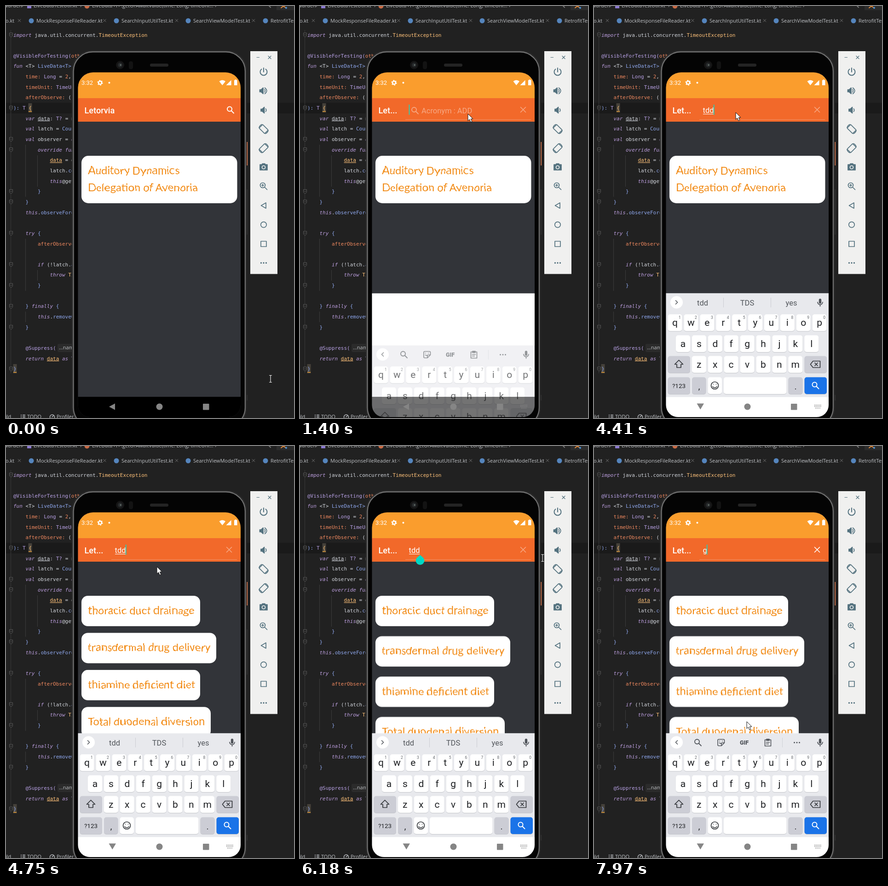
An HTML page for the animation above (8000 ms loop, 626 by 894 pixels).

```html
<!DOCTYPE html>
<html lang="en">
<head>
<meta charset="utf-8">
<title>Acronym search</title>
<style>
html, body { margin: 0; width: 100%; height: 100%; overflow: hidden; background: #212121; }
svg { display: block; width: 626px; height: 894px; }
text { font-family: Roboto, sans-serif; white-space: pre; }
.code text { font: 11px "DejaVu Sans Mono", monospace; fill: #d4d7de; }
.ui text { font: 11px "Open Sans", "Noto Sans", sans-serif; fill: #c0c3c7; }
.k { fill: #bd9fdf; font-style: italic; }
.o { fill: #f0895f; }
.y { fill: #ffc27a; }
.v { fill: #b9a2e6; }
.b { fill: #8fa8ee; }
.u { fill: #ffc27a; text-decoration: underline; }
.w { text-decoration: underline; }
.line { fill: none; stroke-linecap: round; stroke-linejoin: round; }
.hand text { font: 400 23.8px Lato, sans-serif; fill: #f28c18; filter: url(#wobble); }
.mid { text-anchor: middle; }

.s { animation: 8s step-end infinite; }
.m { animation: 8s linear infinite; }
.idle { animation-name: idle; }
.open { animation-name: open; }
.hint { animation-name: hint; }
.t1 { animation-name: t1; }
.t2 { animation-name: t2; }
.t3 { animation-name: t3; }
.under { animation-name: under; }
.tg { animation-name: tg; }
.clear { animation-name: clear; }
.caret { animation-name: caret; }
.drop { animation-name: drop; }
.tools { animation-name: tools; }
.sugA { animation-name: sugA; }
.sugB { animation-name: sugB; }
.back { animation-name: back; }
.down { animation-name: down; }
.sheet { animation-name: sheet; }
.keys { animation-name: keys; }
.nav { animation-name: nav; }
.old { animation-name: old; }
.list { animation-name: list; }
.card { animation-name: spread; }
.mouse { animation-name: mouse; }
.beam { animation-name: beam; }
.arrow { animation-name: arrow; }

@keyframes idle { 0% { opacity: 1 } 14.125%, to { opacity: 0 } }
@keyframes open { 0% { opacity: 0 } 14.125%, to { opacity: 1 } }
@keyframes hint { 0% { opacity: 0 } 14.125% { opacity: .42 } 35.125% { opacity: 0 } 86.25% { opacity: .42 } 99.5%, to { opacity: 0 } }
@keyframes t1 { 0% { opacity: 0 } 35.125% { opacity: 1 } 36.75%, to { opacity: 0 } }
@keyframes t2 { 0% { opacity: 0 } 36.75% { opacity: 1 } 38.375%, to { opacity: 0 } }
@keyframes t3 { 0% { opacity: 0 } 38.375% { opacity: 1 } 86.25%, to { opacity: 0 } }
@keyframes under { 0% { opacity: 0 } 43.25% { opacity: 1 } 86.25%, to { opacity: 0 } }
@keyframes tg { 0% { opacity: 0 } 99.5%, to { opacity: 1 } }
@keyframes clear { 0% { opacity: .42 } 86.25%, to { opacity: 1 } }
@keyframes caret {
  0% { opacity: 0; transform: none }
  15.75% { opacity: 1 }
  22% { opacity: 0 }
  28.5% { opacity: 1; transform: none }
  35.125% { opacity: 1; transform: translateX(5.5px) }
  36.75% { opacity: 1; transform: translateX(14.5px) }
  38.375% { opacity: 1; transform: translateX(23.5px) }
  49.125% { opacity: 0; transform: translateX(23.5px) }
  55.125% { opacity: 1; transform: translateX(23.5px) }
  62% { opacity: 0; transform: translateX(23.5px) }
  68.2% { opacity: 1; transform: translateX(23.5px) }
  74.75% { opacity: 0; transform: none }
  86.25% { opacity: 1; transform: none }
  92.5% { opacity: 0; transform: none }
  98.75% { opacity: 1; transform: none }
  99.5%, to { opacity: 1; transform: translateX(8.5px) }
}
@keyframes drop { 0% { opacity: 0 } 74.75% { opacity: 1 } 86.25%, to { opacity: 0 } }
@keyframes tools { 0% { opacity: 1 } 37.5% { opacity: 0 } 87.5%, to { opacity: 1 } }
@keyframes sugA { 0% { opacity: 0 } 37.5% { opacity: 1 } 43.25%, to { opacity: 0 } }
@keyframes sugB { 0% { opacity: 0 } 43.25% { opacity: 1 } 87.5%, to { opacity: 0 } }
@keyframes back { 0% { opacity: 1 } 18.4%, to { opacity: 0 } }
@keyframes down { 0% { opacity: 0 } 18.4%, to { opacity: 1 } }
@keyframes sheet { 0% { opacity: 0 } 15.75%, to { opacity: 1 } }
@keyframes keys {
  0%, 15.75% { opacity: 0; transform: translateY(224px) }
  17.5% { opacity: .62; transform: translateY(114px); animation-timing-function: ease-out }
  20%, to { opacity: 1; transform: none }
}
@keyframes nav { 0%, 15.75% { opacity: 1 } 17.5% { opacity: .55 } 20%, to { opacity: 0 } }
@keyframes old { 0%, 56.75% { opacity: 1 } 58.4%, to { opacity: 0 } }
@keyframes list { 0%, 57.5% { opacity: 0 } 59.2%, to { opacity: 1 } }
@keyframes spread {
  0%, 60.25% { transform: translateY(calc(var(--i) * -7.2px)); animation-timing-function: ease-in-out }
  63.75%, to { transform: none }
}
@keyframes mouse {
  0%, .875% { transform: translate(575px, 809px) }
  3.75% { transform: translate(556px, 600px) }
  6.25% { transform: translate(515px, 400px) }
  8.5% { transform: translate(462px, 270px) }
  10.875%, 14.5% { transform: translate(484px, 232px) }
  16.625% { transform: translate(381px, 235px) }
  17.5% { transform: translate(365px, 234px) }
  20% { transform: translate(354px, 233px) }
  23.5%, 56.75% { transform: translate(308px, 231px) }
  59.375% { transform: translate(328px, 262px) }
  60.5% { transform: translate(329px, 259px) }
  64.6% { transform: translate(318px, 238px) }
  70.6%, 74.75% { transform: translate(310px, 232px) }
  77.25% { transform: translate(527px, 243px) }
  80% { transform: translate(575px, 236px) }
  84%, 86.5% { transform: translate(486px, 224px) }
  88.5% { transform: translate(470px, 310px) }
  94.5% { transform: translate(396px, 570px) }
  96.6% { transform: translate(348px, 618px) }
  99.5%, to { transform: translate(332px, 598px) }
}
@keyframes beam { 0% { opacity: 1 } 6% { opacity: 0 } 76.9% { opacity: 1 } 77.6%, to { opacity: 0 } }
@keyframes arrow { 0% { opacity: 0 } 6% { opacity: 1 } 76.9% { opacity: 0 } 77.6%, to { opacity: 1 } }
</style>
</head>
<body>
<svg viewBox="0 0 626 894">
  <defs>
    <filter id="wobble" x="-5%" y="-20%" width="110%" height="140%" color-interpolation-filters="sRGB">
      <feTurbulence type="fractalNoise" baseFrequency=".055" numOctaves="1" seed="4"/>
      <feDisplacementMap in="SourceGraphic" scale="5" xChannelSelector="R" yChannelSelector="G"/>
    </filter>
    <clipPath id="screen"><path d="M156.500 177a33 33 0 0 1 33-33H477a33 33 0 0 1 33 33V866a26 26 0 0 1-26 26H182.500a26 26 0 0 1-26-26Z"/></clipPath>
    <clipPath id="body"><path d="M156 251H511V892H156Z"/></clipPath>
    <g id="lens" class="line"><circle cx="-2" cy="-2" r="5"/><path d="M2 2L7 7"/></g>
    <g id="mic"><rect x="-2.700" y="-8.500" width="5.400" height="11" rx="2.700"/><path class="line" stroke="#50545a" stroke-width="1.700" d="M-5.500-1a5.500 5.500 0 0 0 11 0M0 5V8"/></g>
  </defs>

  <!-- editor -->
  <rect y="210" width="626" height="23" fill="#1a1a1a"/>
  <path d="M10.500 52V797" stroke="#3a3a3a"/>
  <path d="M42.500 301V414M68.500 324V392M42.500 505V618M68.500 573V596M42.500 663V686" stroke="#3b3b3b"/>
  <g id="folds" fill="#212121" stroke="#595959"></g>
  <rect x="48.500" y="211" width="8" height="20" fill="#45413a"/>
  <rect x="15.500" y="777" width="8" height="20" fill="#45413a"/>
  <path d="M49 229h7M16 795h7" stroke="#eda23a" stroke-width="1.500"/>
  <g id="code" class="code"></g>
  <g class="ui">
    <rect x="112" y="733" width="50" height="18" rx="3" fill="#2b2b2b"/>
    <text x="115" y="745">...names</text>
    <text x="-1" y="3">varden</text><text x="34" y="3">›</text>
    <text x="60" y="3">LiveDataTestUtil.kt</text><text x="161" y="3">›</text>
    <text x="187" y="3">LiveData&lt;T&gt;.getOrAwaitValue(time: Long, timeUni...</text><text x="454" y="3">›</text>
    <rect x="46" y="-4" width="9" height="9" fill="#8c7ad0"/>
    <circle cx="176" cy="0" r="5.500" fill="#c96b45"/>
    <path class="line" d="M570-2l5 5" stroke="#777" stroke-width="2"/>
    <rect x="588" y="0" width="38" height="9" fill="#2c2c2c"/>
    <path class="line" d="M598 4l5-4 5 4" stroke="#e48a3a" stroke-width="2"/><circle cx="609" cy="4" r="2" fill="#4c94d8"/>
    <text x="-1" y="36">o.kt</text>
    <text x="-1" y="895">ild</text><text x="46" y="895">TODO</text><text x="110" y="895">Profiler</text>
    <path d="M32 887.500h2m2 0h6M32 890.500h2m2 0h6M32 893.500h2m2 0h6" stroke="#b4b7bb" stroke-width="1.500"/>
    <path class="line" d="M96 894a5 5 0 1 1 9 0M100 892l3-3" stroke="#b4b7bb" stroke-width="1.500"/>
    <g id="tabs"></g>
  </g>

  <!-- phone -->
  <path d="M522 295h3v51h-3Z" fill="#ef8254"/>
  <path d="M522 398h2.500v98h-2.500ZM522 844h2.500v12h-2.500Z" fill="#3a3a3a"/>
  <rect x="144" y="97.500" width="378.500" height="818" rx="44" fill="#030303" stroke="#2c2c2c" stroke-width="2"/>
  <rect x="146.500" y="99.500" width="373.500" height="814" rx="42" fill="#050505" stroke="#727272" stroke-width="2.400"/>
  <rect x="150.500" y="103" width="365.500" height="807" rx="38" fill="#040404"/>
  <circle cx="248" cy="128" r="9" fill="#151515"/><circle cx="248" cy="128" r="5" fill="#26292b"/><circle cx="249" cy="128" r="1.700" fill="#66706a"/>
  <rect x="267" y="120" width="9" height="17" rx="4" fill="#131313"/>
  <rect x="313" y="125" width="40" height="6.500" rx="3" fill="#242424"/>

  <g clip-path="url(#screen)">
    <rect x="156" y="144" width="355" height="750" fill="#323439"/>
    <rect x="156" y="144" width="355" height="56.500" fill="#fa9d2d"/>
    <rect x="156" y="200" width="355" height="51" fill="#f2692a"/>
    <g fill="#fff">
      <text x="164" y="171" font-size="13">3:32</text>
      <circle cx="204.500" cy="166.500" r="3.400" fill="none" stroke="#fff" stroke-width="2.500"/>
      <circle cx="204.500" cy="166.500" r="5.300" fill="none" stroke="#fff" stroke-width="1.600" stroke-dasharray="2.600 2.950"/>
      <circle cx="224.500" cy="166.500" r="2"/>
      <path d="M463.500 163.500q6.750-5.500 13.500 0l-6.750 8.500Z"/>
      <path d="M489.500 161v11h-11Z" fill-opacity=".45"/><path d="M489.500 161v11h-11l6-6Z"/>
      <path d="M497.500 161v-1.200h3.500V161h1.500v11h-6.500V161Z"/>
    </g>

    <!-- app bar -->
    <g class="s idle" fill="#fff">
      <text x="170.500" y="233" font-size="18.200" font-weight="500">Letorvia</text>
      <use href="#lens" x="488" y="225.500" stroke="#fff" stroke-width="2"/>
    </g>
    <g class="s open" fill="#fff" font-size="16.500">
      <text x="170.500" y="233" font-size="18.200" font-weight="500">Let...</text>
      <path d="M229 246.500H502" stroke="#fff" stroke-opacity=".27"/>
      <g class="s hint">
        <use href="#lens" x="250" y="227" stroke="#fff" stroke-width="1.800"/>
        <text x="264" y="233">Acronym : ADD</text>
      </g>
      <text class="s t1" x="236.500" y="232">t</text>
      <text class="s t2" x="236.500" y="232">td</text>
      <text class="s t3" x="236.500" y="232">tdd</text>
      <path class="s under" d="M237 234.500H260" stroke="#fff"/>
      <text class="s tg" x="236.500" y="232">g</text>
      <path class="line s clear" d="M479.500 219.500l11 11m0-11l-11 11" stroke="#fff" stroke-width="1.600"/>
      <path class="s caret" d="M237.500 214V236" stroke="#1fd3bd" stroke-width="1.800"/>
    </g>

    <!-- results -->
    <g class="hand" clip-path="url(#body)">
      <g class="m old">
        <rect x="164" y="325" width="338.500" height="103" rx="15" fill="#fff"/>
        <text x="178" y="365">Auditory Dynamics</text>
        <text x="178" y="402">Delegation of Avenoria</text>
      </g>
      <g class="m list" id="list"></g>
    </g>
    <path class="s drop" d="M261 236.500l6.500 5.500a9.300 9.300 0 1 1-13 0Z" fill="#00d9c5"/>

    <!-- keyboard -->
    <rect class="s sheet" x="156" y="623.500" width="355" height="269" fill="#fff"/>
    <g class="m keys">
      <rect x="156" y="623.500" width="355" height="225" fill="#e8e9ed"/>
      <circle cx="179.500" cy="643" r="13.500" fill="#fff"/>
      <g class="s tools">
        <path class="line" d="M181.500 639l-4 4 4 4" stroke="#50545a" stroke-width="1.600"/>
        <use href="#lens" x="226" y="643.500" stroke="#50545a" stroke-width="1.800"/>
        <g class="line" stroke="#50545a" stroke-width="1.600">
          <path d="M283.500 644v-5.500a2 2 0 0 0-2-2h-10.500a2 2 0 0 0-2 2v10a2 2 0 0 0 2 2h6ZM283.500 644h-4.500a2 2 0 0 0-2 2v4.500M273 640v.5M279 640v.5M272.500 644q2 2 3.500 1"/>
          <path d="M371.500 637.500h13v13.500h-13ZM375 636h6v3h-6ZM374.500 643h7M374.500 646.500h5"/>
        </g>
        <text class="mid" x="326.500" y="647.500" font-size="12.500" font-weight="900" fill="#50545a">GIF</text>
        <path d="M409.500 633v21" stroke="#d0d2d7"/>
        <path class="line" d="M435.500 643.500h0m5.500 0h0m5.500 0h0" stroke="#50545a" stroke-width="3"/>
      </g>
      <g id="sugs" class="mid" font-size="16.500" fill="#53575c"></g>
      <use href="#mic" x="491.500" y="643.500" fill="#50545a"/>
      <g id="keys" class="mid" font-size="21" fill="#1d1f22"></g>
      <g class="line" stroke="#33363a" stroke-width="1.700">
        <path d="M184.500 768.500l9 9h-4.500v7h-9v-7h-4.500Z"/>
        <path d="M476 770.500h15.500v14H476l-5.500-7ZM480 774.500l6 6m0-6l-6 6"/>
        <circle cx="262.500" cy="823.500" r="8"/><path d="M258 826q4.500 5 9 0M259.500 820.500h0M265.500 820.500h0"/>
      </g>
      <use href="#lens" x="481.500" y="823.500" stroke="#fff" stroke-width="2"/>
    </g>

    <!-- navigation bar -->
    <rect class="m nav" x="156" y="848" width="355" height="45"/>
    <g fill="#858585">
      <path class="s back" d="M224 869.500l13-7v14Z"/>
      <path class="s down" d="M223.500 862.500h15.500l-7.750 13Z"/>
      <circle cx="333.500" cy="869.500" r="7"/>
      <rect x="428" y="863" width="13.500" height="13.500" rx="1"/>
      <path class="s sheet" d="M479 866h15m-15 3h15m-13 3.500h11" fill="none" stroke="#858585" stroke-width="1.700" stroke-dasharray="1.800 1.400"/>
    </g>
  </g>

  <!-- emulator controls -->
  <rect x="531" y="98" width="59" height="483.500" fill="#f0f0ef"/>
  <g class="line" stroke="#54727f" stroke-width="1.700">
    <path d="M545 111.500h5.500M570 108.500l6 6m0-6l-6 6" stroke-width="1.200"/>
    <path d="M560 134.500v8.500M555.500 137a7.500 7.500 0 1 0 9 0" stroke-width="2"/>
    <path d="M551.500 181.500h3l4.500-4v13l-4.500-4h-3Z" fill="#54727f"/>
    <path d="M562 181q2.500 3 0 6M562.500 177.500q8.500 6.500 0 13"/>
    <path d="M554 223.500h3l4.500-4v13l-4.500-4h-3Z" fill="#54727f"/><path d="M564.500 223q2.500 3 0 6"/>
    <g id="turn"><rect x="554.500" y="258.500" width="11" height="17" rx="1" transform="rotate(-45 560 267)"/><path d="M550 264a10.500 10.500 0 0 1 6-7M570 270a10.500 10.500 0 0 1-6 7"/></g>
    <use href="#turn" transform="matrix(-1 0 0 1 1120 41.500)"/>
    <path d="M552 344h4l1.500-2h5l1.500 2h4v12h-16Z" fill="#54727f"/><circle cx="560" cy="350" r="3.500" stroke="#f0f0ef" fill="#54727f"/>
    <circle cx="558" cy="389" r="5.500"/><path d="M562.500 393.500l5 5M555.500 389h5M558 386.500v5"/>
    <path d="M554.500 433l10.500-6v12Z"/><circle cx="560" cy="474.500" r="6.200"/><rect x="554" y="510.500" width="12" height="11.500"/>
    <path d="M554.500 557.500h0m5.500 0h0m5.500 0h0" stroke-width="3.300"/>
  </g>

  <g class="m mouse">
    <path class="s beam line" d="M-2.500-7.500h2l.5.500.5-.5h2M0-7V7M-2.500 7.500h2l.5-.5.500.5h2" stroke="#eee" stroke-width="1.200"/>
    <path class="s arrow" d="M0 0V15.200L3.500 12l2.500 6 2.800-1.200L6.300 11H11Z" fill="#fff" stroke="#111"/>
  </g>
</svg>
<script>
const $ = id => document.getElementById(id);
const esc = s => s.replace(/&/g, '&amp;').replace(/</g, '&lt;');
const rowY = r => 62.500 + 22.65 * r;

// Row, indent, tokens; the first letter of a token is its class
const code = [
  [0, 0, 'kimport |pjava.util.concurrent.|yTimeoutException'],
  [2, 0, 'v@VisibleForTesting(|ootherwise'],
  [3, 0, 'kfun |p<T> |bLiveData<T>|p.'],
  [4, 1, 'otime: |vLong |p= |o2|p,'],
  [5, 1, 'otimeUnit: |vTimeUnit'],
  [6, 1, 'oafterObserve: |p() ->'],
  [7, 0, 'b): |vT |y{'],
  [8, 1, 'kvar |wdata|p: |vT? |p= null'],
  [9, 1, 'kval |platch = |bCountDown'],
  [10, 1, 'kval |pobserver = |kobject'],
  [11, 2, 'koverride fun |bonChanged'],
  [12, 3, 'udata|p = o'],
  [13, 3, 'platch.|bcountDown'],
  [14, 3, 'kthis|p@getOrAwait'],
  [15, 2, 'b}'], [16, 1, 'b}'],
  [17, 1, 'kthis|p.|bobserveForever'],
  [19, 1, 'ktry |b{'],
  [20, 2, 'oafterObserve'],
  [22, 2, 'kif |p(!latch.|bawait'],
  [23, 3, 'kthrow |yTimeout'],
  [24, 2, 'b}'], [26, 1, 'b} |kfinally |b{'],
  [27, 2, 'kthis|p.|bremoveObserver'],
  [28, 1, 'b}'],
  [30, 1, 'v@Suppress('],
  [31, 1, 'kreturn |udata|k as |vT'],
  [32, 0, 'b}']
];
$('code').innerHTML = code.map(([r, n, line]) =>
  `<text x="${16 + n * 26.500}" y="${rowY(r) + 4}">` +
  line.split('|').map(s => `<tspan class="${s[0]}">${esc(s.slice(1))}</tspan>`).join('') + '</text>').join('');

$('folds').innerHTML = [0, 7, 10, 11, 15, 16, 19, 22, 24, 26, 28, 32].map(r =>
  `<path d="M7.500 ${rowY(r) - 4}h7v6l-3.500 3-3.500-3ZM9 ${rowY(r)}h4"/>`).join('');

const tabs = [[66, 'MockResponseFileReader.kt'], [251, 'SearchInputUtilTest.kt'], [407, 'SearchViewModelTest.kt'], [575, 'RetrofitTest.kt']];
$('tabs').innerHTML = tabs.map(([x, name]) =>
  `<circle cx="${x - 11}" cy="32" r="5.500" fill="#5585bd"/><text x="${x}" y="36">${name}</text>`).join('') +
  [29, 214.500, 371, 538].map(x => `<path d="M${x - 3} 28.500l6 6m0-6l-6 6" stroke="#777"/>`).join('');

const cards = [['thoracic duct drainage', 258], ['transdermal drug delivery', 293], ['thiamine deficient diet', 258], ['Total duodenal diversion', 281]];
$('list').innerHTML = cards.map(([text, w], i) => {
  const y = 325 + i * 87.6;
  return `<g class="m card" style="--i:${i}"><rect x="164" y="${y}" width="${w}" height="66" rx="14" fill="#fff"/><text x="178" y="${y + 40}">${text}</text></g>`;
}).join('');

const sugs = (cls, words) => `<g class="s ${cls}">` +
  words.map((w, i) => `<text x="${[236, 333, 429][i]}" y="650">${w}</text>`).join('') +
  '<path d="M281.500 633v21M384.500 633v21" stroke="#cbcdd2"/><path class="line" d="M177.500 639l4 4-4 4" stroke="#50545a" stroke-width="1.600"/></g>';
$('sugs').innerHTML = sugs('sugA', ['td', 'to', 'the']) + sugs('sugB', ['tdd', 'TDS', 'yes']);

const key = (x, y, w, fill = '#fff', h = 36.500) =>
  `<rect x="${x}" y="${y + 1}" width="${w}" height="${h}" rx="5" fill="#c3c5ca"/><rect x="${x}" y="${y}" width="${w}" height="${h}" rx="5" fill="${fill}"/>`;
const rows = [['qwertyuiop', 176, 669], ['asdfghjkl', 193.500, 714.500], ['zxcvbnm', 228.300, 759.500]];
const gray = '#cccdd5';
$('keys').innerHTML = rows.map(([chars, x0, y], r) => [...chars].map((c, i) => {
  const x = x0 + i * 34.9;
  return key(x - 15.500, y, 31) + `<text x="${x}" y="${y + 25}">${c}</text>` +
    (r ? '' : `<text x="${x + 10.500}" y="${y + 10}" font-size="8.500" fill="#5f6368">${(i + 1) % 10}</text>`);
}).join('')).join('') +
  key(160.500, 759.500, 48.500, gray) + key(457.500, 759.500, 48.500, gray) +
  key(160.500, 805.500, 48.500, gray) + key(213, 805.500, 30.500, gray) + key(247.500, 805.500, 30.500) +
  key(282, 805.500, 136.500) + key(422.500, 805.500, 31, gray) + key(457.500, 805.500, 48.500, '#1a73e8') +
  '<text x="184.500" y="829" font-size="13.500">?123</text><text x="228.500" y="832" font-size="18">,</text><text x="438" y="832" font-size="18">.</text>';
</script>
</body>
</html>
```
